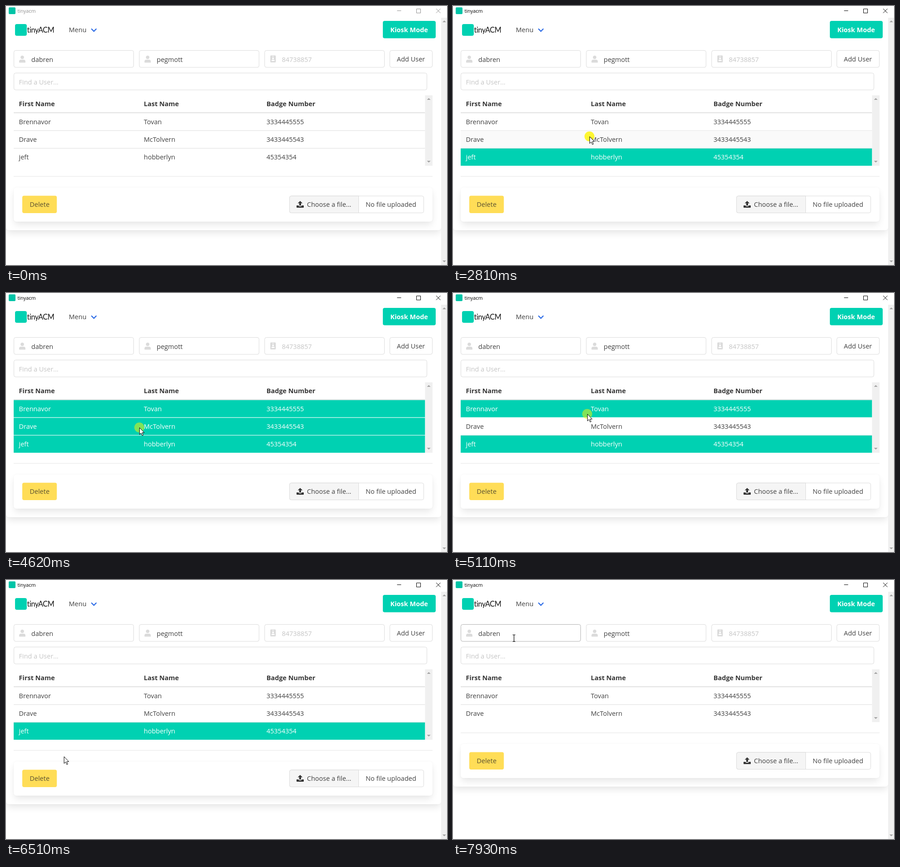
Animation of 976x574 px, one loop 8000 ms. Source, as an HTML page:

```html
<!DOCTYPE html>
<html lang="en">
<head>
<meta charset="utf-8">
<title>tinyacm</title>
<style>
  html, body { margin: 0; width: 100%; height: 100%; overflow: hidden; background: #fff; }
  #view { position: absolute; left: 0; top: 26px; width: 963px; height: 548px; overflow: hidden; }
  .box {
    position: absolute; background: #fff; border-radius: 6px;
    box-shadow: 0 8px 16px -2px rgba(10,10,10,.1), 0 0 0 1px rgba(10,10,10,.02);
  }
  #page { left: 0; top: -20px; width: 963px; height: 491px; }
  #panel { left: 17px; top: 376px; width: 927px; height: 76px; }
  svg { position: absolute; left: 0; top: 0; }
  text { font: 14.5px "Open Sans", "Noto Sans", sans-serif; fill: #404040; white-space: pre; }
  .bold { font-weight: 700; fill: #363636; }
  .hint { fill: #c5c5c5; }
  .field { fill: #fff; stroke: #dbdbdb; }
  .field.hover { stroke: #b0b0b0; }
  .bar { fill: #f0f0f0; }
  .tri { fill: #a3a3a3; }
  .icon { fill: #dbdbdb; }
  .line { fill: #dbdbdb; }
  .row .back { fill: none; }
  .row.hover .back { fill: #fafafa; }
  .row.on .back { fill: #00d1b2; }
  .row.on text { fill: #fff; }
  .row.on .line { fill: #e8faf7; }
  #frame { --ink: #8e8e8e; }
  #frame.active { --ink: #000; }
  #frame text { font-size: 10.9px; fill: var(--ink); }
  #frame path { fill: none; stroke: var(--ink); }
</style>
</head>
<body>
<div id="view">
  <div class="box" id="page"></div>
  <div class="box" id="panel"></div>
</div>
<svg width="976" height="574" viewBox="0 0 976 574">
  <defs>
    <g id="person">
      <circle cx="7" cy="3.8" r="3.8"/>
      <path d="M0 15v-2.2Q0 9 4 9h6q4 0 4 3.8V15q0 .4-.6.4H.6Q0 15.4 0 15Z"/>
    </g>
    <path id="up" class="tri" d="M-4 2 0-2 4 2Z"/>
    <path id="down" class="tri" d="M-4-2 0 2 4-2Z"/>
  </defs>

  <g id="frame">
    <rect x="6" y="3" width="15" height="15" rx="2" fill="#00c4a7"/>
    <text x="25.5" y="15">tinyacm</text>
    <path d="M865.5 10.5h9M908.5 6.5h9v9h-9ZM952 6l9.5 9.5M961.5 6l-9.5 9.5"/>
  </g>

  <rect x="20" y="40" width="26" height="26" rx="4" fill="#00d1b2"/>
  <text x="46.5" y="59" style="font:16.3px Lato,sans-serif;letter-spacing:-.4px;fill:#111">tinyACM</text>
  <text x="139" y="58">Menu</text>
  <path d="M189.5 51l5 5 5-5" fill="none" stroke="#2f6de6" stroke-width="2.4" stroke-linecap="round"/>
  <rect x="834" y="33" width="117" height="38.5" rx="4" fill="#00d1b2"/>
  <text class="bold" x="850.5" y="58" style="fill:#fff">Kiosk Mode</text>

  <rect class="field" id="first" x="17.5" y="98.5" width="265" height="37.5" rx="4"/>
  <rect class="field" x="295" y="98.5" width="265" height="37.5" rx="4"/>
  <rect class="field" x="572.5" y="98.5" width="265" height="37.5" rx="4"/>
  <rect class="field" x="849.5" y="98.5" width="94" height="37.5" rx="4"/>
  <rect class="field" id="find" x="17.5" y="148.5" width="914" height="37.5" rx="4"/>
  <use class="icon" href="#person" x="29" y="110"/>
  <use class="icon" href="#person" x="306.5" y="110"/>
  <rect class="icon" x="585" y="109.500" width="12" height="15.500" rx="1.600"/>
  <g fill="#fff">
    <rect x="589" y="111" width="4" height="1"/>
    <circle cx="591" cy="116" r="2"/>
    <path d="M587.500 122q0-3 2-3h3q2 0 2 3Z"/>
  </g>
  <text x="56" y="123.500">dabren</text>
  <text x="333.500" y="123.500">pegmott</text>
  <text class="hint" x="610.500" y="123.500">84738857</text>
  <text x="865" y="123">Add User</text>
  <text class="hint" x="28.500" y="173.500">Find a User...</text>

  <text class="bold" x="28.500" y="222">First Name</text>
  <text class="bold" x="305" y="222">Last Name</text>
  <text class="bold" x="576.500" y="222">Badge Number</text>
  <rect class="line" x="17" y="235.700" width="910.500" height="1.700"/>
  <g id="rows"></g>
  <rect class="bar" id="track" x="927.500" y="198" width="16.500" height="156"/>
  <use href="#up" x="935.700" y="206"/>

  <g id="below">
    <use href="#down" x="935.700" y="345"/>
    <rect x="17" y="376.700" width="927" height="1.800" fill="#efefef"/>
    <rect x="36" y="420.500" width="76.500" height="38.500" rx="4" fill="#ffdd57"/>
    <text x="52.500" y="445" style="fill:#5a5030">Delete</text>
    <rect class="field" x="627.500" y="421" width="297" height="37.500" rx="4"/>
    <path d="M780.500 421H631.500q-4 0-4 4v29.500q0 4 4 4h149Z" fill="#f5f5f5" stroke="#dbdbdb"/>
    <path d="M651 432l5.300 5.300h-3.300v5h-4v-5h-3.300ZM643 442h4.500q.5 2 2 2h3q1.500 0 2-2h4.500v4q0 1-1 1h-14q-1 0-1-1Z" fill="#363636"/>
    <text x="666" y="445">Choose a file...</text>
    <text x="796" y="445">No file uploaded</text>
  </g>

  <rect class="bar" x="963" y="26" width="13" height="548"/>
  <use href="#up" x="970" y="34"/>
  <use href="#down" x="970" y="566"/>

  <g id="mouse">
    <circle id="spot" r="11" fill="#fff500"/>
    <path id="arrow" d="M.5.5V15.600L4 12.400 6.500 18 8.800 17 6.400 11.500H11Z" fill="#fff" stroke="#000"/>
    <path id="beam" d="M-3-7.500h2.200L0-6.800.8-7.500H3M0-7V7M-3 7.500h2.200L0 6.800l.8.700H3" fill="none" stroke="#000" stroke-width="1.200"/>
  </g>
</svg>
<script>
  const $ = id => document.getElementById(id);
  const LOOP = 8000, ENTER = 750, FOCUS = 2110, REMOVED = 6880;

  // selected from .. to (ms)
  const people = [
    { cells: ['Brennavor', 'Tovan', '3334445555'], on: [3340, 5180] },
    { cells: ['Drave', 'McTolvern', '3433445543'], on: [2870, 4700] },
    { cells: ['jeft', 'hobberlyn', '45354354'], on: [2210, REMOVED] }
  ];

  // start, end, Bezier points
  const moves = [
    [750, 1530, [590, 572], [300, 430], [175, 380], [305, 323]],
    [2450, 2790, [305, 323], [302, 289]],
    [2900, 3220, [302, 289], [303, 257]],
    [3520, 4030, [303, 257], [303, 344]],
    [4210, 4610, [303, 344], [295, 298]],
    [4740, 4910, [295, 298], [297, 268]],
    [5210, 5710, [297, 268], [301, 345]],
    [6030, 6810, [301, 345], [300, 195], [60, 460], [85, 437]],
    [7100, 7930, [85, 437], [120, 330], [220, 210], [135, 129]]
  ];

  // press, release, opacity
  const clicks = [
    [2110, 2310, .8], [2810, 2870, .8], [3240, 3340, .8],
    [4620, 4700, .5], [5080, 5180, .5], [6840, 6930, .8]
  ];

  const rowTop = i => 237.4 + 39.2 * i;
  const columns = [28.5, 305, 576.5];

  $('rows').innerHTML = people.map((p, i) => `<g class="row">
    <rect class="back" x="17" y="${rowTop(i)}" width="910.5" height="38.2"/>
    ${i < 2 ? `<rect class="line" x="17" y="${rowTop(i) + 38.2}" width="910.5" height="1"/>` : ''}
    ${p.cells.map((c, k) => `<text x="${columns[k]}" y="${262 + 39 * i}">${c}</text>`).join('')}
  </g>`).join('');
  const rows = [...document.querySelectorAll('.row')];

  const within = (v, a, b) => v >= a && v < b;
  const show = (el, yes) => el.style.display = yes ? '' : 'none';
  const mix = (a, b, s) => a.map((v, i) => v + (b[i] - v) * s);

  function bezier(points, s) {
    while (points.length > 1) points = points.slice(1).map((p, i) => mix(points[i], p, s));
    return points[0];
  }

  function pointer(t) {
    const [from, to, ...path] = moves.filter(m => m[0] <= t).pop() || moves[0];
    const s = Math.min(1, Math.max(0, (t - from) / (to - from)));
    return bezier(path, s * s * (3 - 2 * s));
  }

  function draw(t) {
    const [x, y] = pointer(t);
    const seen = t >= ENTER, gone = t >= REMOVED, shift = gone ? 39 : 0;

    $('frame').classList.toggle('active', t >= FOCUS);
    $('below').setAttribute('transform', `translate(0 ${-shift})`);
    $('track').setAttribute('height', 156 - shift);
    $('page').style.height = 491 - shift + 'px';
    $('panel').style.top = 376 - shift + 'px';

    rows.forEach((row, i) => {
      row.classList.toggle('on', within(t, ...people[i].on));
      row.classList.toggle('hover', seen && within(x, 17, 927) && within(y, rowTop(i), rowTop(i + 1) - 1));
    });
    show(rows[2], !gone);
    show(rows[1].querySelector('.line'), !gone);

    const overFirst = within(x, 17, 283) && within(y, 98, 136);
    const overFind = within(x, 17, 932) && within(y, 148, 186);
    $('first').classList.toggle('hover', overFirst);
    $('find').classList.toggle('hover', overFind);

    const click = clicks.find(c => within(t, c[0], c[1]));
    show($('mouse'), seen);
    $('mouse').setAttribute('transform', `translate(${Math.round(x)} ${Math.round(y)})`);
    show($('spot'), click);
    if (click) $('spot').setAttribute('opacity', click[2]);
    show($('beam'), overFirst || overFind);
    show($('arrow'), !overFirst && !overFind);
  }

  const start = performance.now();
  function tick() {
    draw((performance.now() - start) % LOOP);
    requestAnimationFrame(tick);
  }
  tick();
</script>
</body>
</html>
```
